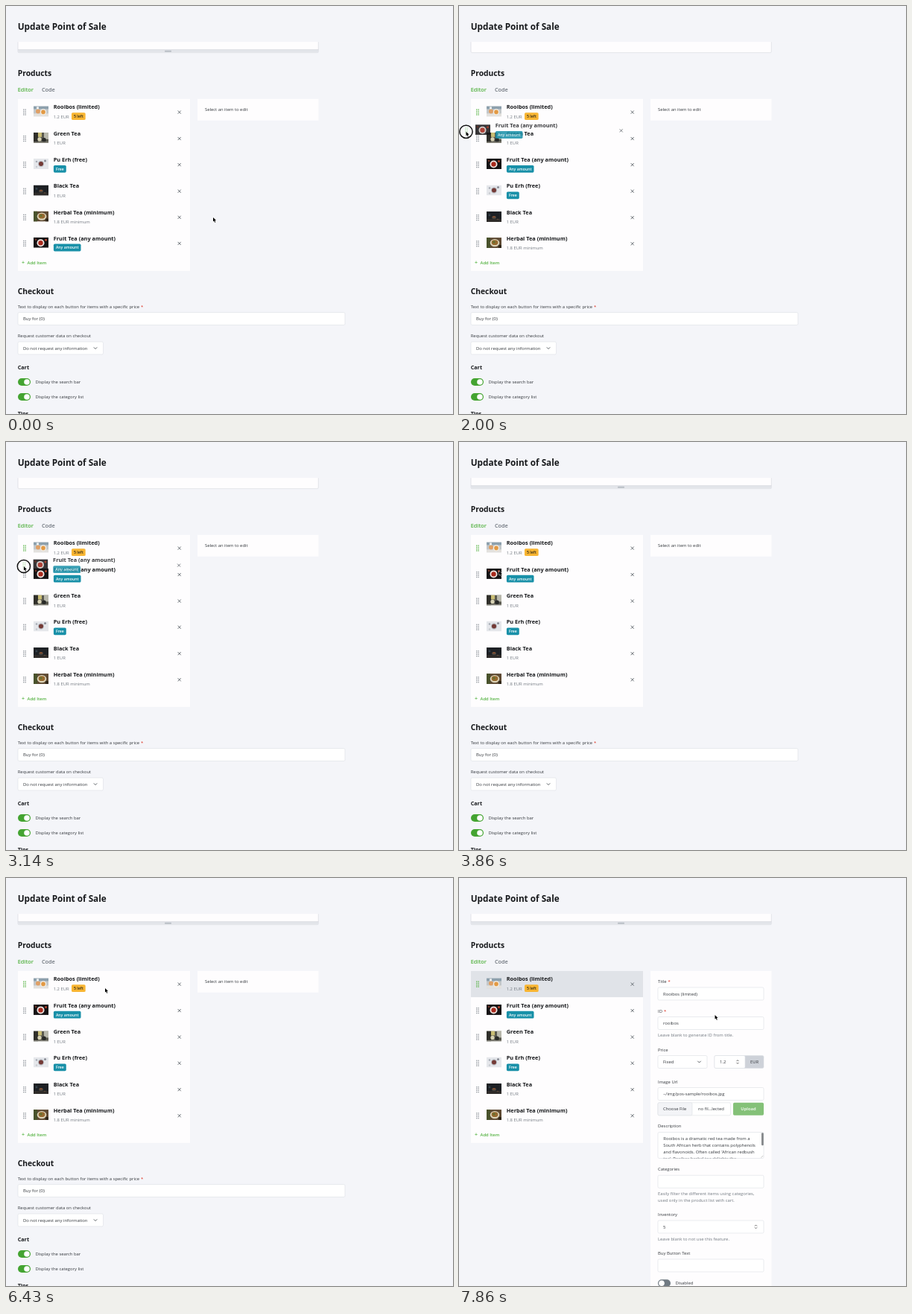
Animation of 600x548 px, one loop 8000 ms. Source, as an HTML page with a canvas:

```html
<!DOCTYPE html>
<html lang="en">
<head>
<meta charset="utf-8">
<title>Update Point of Sale</title>
<style>
html, body { margin: 0; width: 100%; height: 100%; overflow: hidden; background: #f4f5f9; }
canvas { display: block; width: 600px; height: 548px; }
</style>
</head>
<body>
<canvas id="stage"></canvas>
<script>
const canvas = document.getElementById('stage');
const ctx = canvas.getContext('2d');
const ratio = window.devicePixelRatio || 1;
canvas.width = 600 * ratio;
canvas.height = 548 * ratio;

const LOOP = 8000, STEPS = 56;
const BG = '#f4f5f9', CARD = '#fefdfe', INK = '#17191c', TEXT = '#34383d', MUTED = '#737a82';
const GREEN = '#51b13e', TOGGLE = '#44a431', TEAL = '#1890a8', LINE = '#dcdfe4', RED = '#c8301c';
const BODY = 5.88;
const GRAB = { x: 24.5, y: 320.3 };

// step, x, y of the pointer tip
const PATH = [
  [0, 278, 284], [8, 24.5, 320], [9, 24.5, 320], [10, 27.2, 305.5], [14, 9.5, 168.8], [15, 10, 167],
  [16, 16, 166.5], [19, 24, 167], [25, 23.8, 167], [33, 217, 207], [34, 222.5, 211], [36, 239, 213],
  [38, 240, 213], [44, 134.5, 149], [45, 133, 148], [50, 133, 148], [55, 343.5, 184]
];

const rooibos = { name: 'Rooibos (limited)', price: '1.2 EUR', badge: '5 left', thumb: thumbRooibos };
const green = { name: 'Green Tea', price: '1 EUR', thumb: thumbGreen };
const puErh = { name: 'Pu Erh (free)', badge: 'Free', thumb: thumbPuErh };
const black = { name: 'Black Tea', price: '1 EUR', thumb: thumbBlack };
const herbal = { name: 'Herbal Tea (minimum)', price: '1.8 EUR minimum', thumb: thumbHerbal };
const fruit = { name: 'Fruit Tea (any amount)', badge: 'Any amount', thumb: thumbFruit };

function text(str, x, y, color = TEXT, size = BODY, weight = 400, align = 'left') {
  ctx.font = `${weight} ${size}px "Open Sans", sans-serif`;
  ctx.fillStyle = color;
  ctx.textAlign = align;
  ctx.fillText(str, x, y);
  return ctx.measureText(str).width;
}

function rect(x, y, w, h, color) {
  ctx.fillStyle = color;
  ctx.fillRect(x, y, w, h);
}

function box(x, y, w, h, fill, stroke, r = 1.7) {
  ctx.beginPath();
  ctx.roundRect(x, y, w, h, r);
  if (fill) { ctx.fillStyle = fill; ctx.fill(); }
  if (stroke) { ctx.strokeStyle = stroke; ctx.lineWidth = 0.6; ctx.stroke(); }
}

function disc(x, y, r, color, ry = r) {
  ctx.beginPath();
  ctx.ellipse(x, y, r, ry, 0, 0, Math.PI * 2);
  ctx.fillStyle = color;
  ctx.fill();
}

function line(points, color, width) {
  ctx.beginPath();
  points.forEach(([x, y], i) => i ? ctx.lineTo(x, y) : ctx.moveTo(x, y));
  ctx.strokeStyle = color;
  ctx.lineWidth = width;
  ctx.stroke();
}

// Thumbnails are drawn in a 20 x 14 area
function thumbRooibos() {
  rect(0, 0, 20, 14, '#c3c8cb');
  rect(0, 0, 20, 4, '#8da0ad');
  rect(0, 10, 20, 4, '#e3e1de');
  disc(6, 7, 3, '#dfa067');
  disc(13, 8, 4.2, '#f3eee6');
  disc(13, 8, 2.8, '#e39a45');
  rect(4, 1, 3, 3, '#eceff0');
}

function thumbGreen() {
  rect(0, 0, 20, 14, '#5b5a50');
  rect(0, 0, 6, 14, '#302f2a');
  rect(6, 0, 5, 6, '#c9bd74');
  rect(14, 0, 6, 9, '#b8b8ac');
  disc(8, 9, 2.6, '#d8d3b5');
  disc(14, 10, 2.8, '#292a28');
  rect(0, 12.5, 20, 1.5, '#88867c');
}

function thumbPuErh() {
  rect(0, 0, 20, 14, '#e5e7eb');
  disc(10, 7, 4.2, '#bfc4ca');
  disc(10, 7, 3, '#743a36');
  disc(4, 4, 1.3, '#a7adb6');
  disc(15.5, 3, 1.5, '#8c8f98');
  disc(4, 11, 1.2, '#c7cad0');
}

function thumbBlack() {
  rect(0, 0, 20, 14, '#1d2024');
  rect(0, 10, 20, 4, '#2e2b29');
  disc(10, 8, 3, '#49443d', 2);
  disc(10, 7.3, 2, '#8c5030', 1);
  disc(15, 10.5, 1.6, '#5a4939', 0.8);
  disc(4, 5, 1.4, '#34414a');
}

function thumbHerbal() {
  rect(0, 0, 20, 14, '#5e4a33');
  rect(0, 0, 5, 14, '#49522c');
  disc(11, 7, 6.3, '#dcd3b8', 5.2);
  disc(11, 6.6, 4.4, '#966a2f', 3.4);
  disc(10, 6, 1.6, '#63702f');
  rect(16, 10, 4, 4, '#302719');
}

function thumbFruit() {
  rect(0, 0, 20, 14, '#151214');
  disc(9.5, 7.5, 5, '#efe8e4');
  disc(9.5, 7.5, 3.2, '#a92a1d');
  disc(16.5, 3.5, 1.5, '#b4402a');
  disc(3, 3, 1.3, '#693023');
}

function handle(y, color) {
  for (let i = 0; i < 8; i++) {
    const dx = i % 2 * 2.4, dy = Math.floor(i / 2) * 2.3;
    rect(23.1 + dx, y - 4.1 + dy, 1.3, 1.3, color);
  }
}

function cross(x, y, color) {
  line([[x - 2, y - 2], [x + 2, y + 2]], color, 0.95);
  line([[x + 2, y - 2], [x - 2, y + 2]], color, 0.95);
}

function badge(label, x, top) {
  const warn = label === '5 left';
  ctx.font = '600 5.2px "Open Sans", sans-serif';
  const w = ctx.measureText(label).width + 6;
  box(x, top + 18.5, w, 9.8, warn ? '#f8b532' : TEAL, null);
  text(label, x + 3, top + 25.3, warn ? '#2b2618' : '#fff', 5.2, 600);
}

function row(item, top, handleColor, crossColor) {
  handle(top + 17.8, handleColor);
  ctx.save();
  ctx.translate(37, top + 9.6);
  ctx.beginPath();
  ctx.rect(0, 0, 20, 14);
  ctx.clip();
  item.thumb();
  ctx.restore();
  text(item.name, 63.7, top + 13.5, INK, 7.35, 700);
  if (item.price) text(item.price, 63.7, top + 25.9, MUTED);
  if (item.badge) badge(item.badge, item.price ? 88 : 63.9, top);
  cross(232.7, top + 17.8, crossColor);
}

function chevron(x, y) {
  line([[x - 2.2, y - 1], [x, y + 1.2], [x + 2.2, y - 1]], '#343a40', 0.8);
}

function spinner(x, y) {
  line([[x - 1.5, y - 0.9], [x, y - 2.4], [x + 1.5, y - 0.9]], '#444', 0.8);
  line([[x - 1.5, y + 0.9], [x, y + 2.4], [x + 1.5, y + 0.9]], '#444', 0.8);
}

function toggle(y, x, on, label) {
  box(x, y - 5, 17, 10, on ? TOGGLE : '#707a82', null, 5);
  disc(on ? x + 12 : x + 5, y, 3.8, '#fff');
  text(label, x + 23.5, y + 2.2);
}

function label(str, x, y, required) {
  const w = text(str, x, y);
  if (required) text('*', x + w + 2, y, '#e0483a', BODY, 600);
}

function field(y, value = '', x = 267, w = 142) {
  box(x, y, w, 17, '#fff', LINE);
  text(value, x + 7, y + 10.7);
}

function header(dragging) {
  box(16, 40, 403.3, 22.7, CARD, '#d3d6dc');
  if (!dragging) {
    rect(16, 58.7, 403.3, 4, '#e3e5ea');
    rect(16, 58.5, 403.3, 0.6, '#cbd0d6');
    box(213, 59.8, 9, 2, '#b9bec5', null, 0.8);
  }
  rect(0, 0, 600, 48.3, BG);
  text('Update Point of Sale', 15.7, 31.7, INK, 11.76, 700);
  text('Products', 15.7, 93.8, INK, 10.3, 700);
  text('Editor', 15.7, 114.7, GREEN, 7.35, 600);
  text('Code', 47.9, 114.7, '#6d747c', 7.35, 600);
}

function checkout() {
  text('Checkout', 15.7, 386.7, INK, 10.3, 700);
  label('Text to display on each button for items with a specific price', 15.7, 405.6, true);
  field(411.5, 'Buy for {0}', 16, 439);
  text('Request customer data on checkout', 15.7, 445);
  field(451, 'Do not request any information', 16, 114.5);
  chevron(120, 459.4);
  text('Cart', 15.7, 488.2, INK, 7.2, 700);
  toggle(505, 16, true, 'Display the search bar');
  toggle(525, 16, true, 'Display the category list');
  text('Tips', 15.7, 550.3, INK, 7.2, 700);
}

function editor() {
  rect(257, 124.8, 162.5, 424, CARD);
  label('Title', 267, 141.1, true);
  field(147, 'Rooibos (limited)');
  label('ID', 267, 180.7, true);
  field(186.5, 'rooibos');
  text('Leave blank to generate ID from title.', 267, 213.4, MUTED);

  label('Price', 267, 232.8);
  field(238.5, 'Fixed', 267, 66);
  chevron(322.5, 246.8);
  box(343, 238.5, 66, 17, '#ced2d9', LINE);
  field(238.5, '1.2', 343, 41);
  spinner(374, 247);
  text('EUR', 396.5, 249.2, TEXT, BODY, 400, 'center');

  label('Image Url', 267, 275.5);
  field(281.5, '~/img/pos-sample/rooibos.jpg');
  field(301.8, '', 267, 97.5);
  box(267, 301.8, 46, 17, '#f3f4f7', LINE);
  text('Choose File', 274, 312.4);
  text('no fil...lected', 321, 312.4);
  box(368, 301.8, 41, 17, '#84c178', null);
  text('Upload', 388.5, 312.4, '#fff', BODY, 600, 'center');

  label('Description', 267, 335.3);
  box(267, 341.5, 142, 35, '#fff', LINE);
  ctx.save();
  ctx.beginPath();
  ctx.rect(267, 341.5, 142, 35);
  ctx.clip();
  ['Rooibos is a dramatic red tea made from a', 'South African herb that contains polyphenols',
    "and flavonoids. Often called 'African redbush", "tea', Rooibos herbal tea delights the"]
    .forEach((str, i) => text(str, 274.3, 351.8 + i * 9.2));
  box(406, 342.3, 2.8, 17, '#85888b', null, 1.2);
  line([[405.5, 375.7], [408.3, 372.9]], '#888', 0.5);
  ctx.restore();

  label('Categories', 267, 393.2);
  field(399.3);
  text('Easily filter the different items using categories,', 267, 425.7, MUTED);
  text('used only in the product list with cart.', 267, 435.1, MUTED);
  label('Inventory', 267, 454.2);
  field(460, '5');
  spinner(398.5, 468.4);
  text('Leave blank to not use this feature.', 267, 487.2, MUTED);
  label('Buy Button Text', 267, 506.2);
  field(512);
  toggle(544.2, 267, false, 'Disabled');
}

function pointer(x, y, ring) {
  if (ring) {
    ctx.beginPath();
    ctx.arc(x, y, 8.6, 0, Math.PI * 2);
    ctx.fillStyle = 'rgba(255,255,255,.5)';
    ctx.fill();
    ctx.strokeStyle = '#111';
    ctx.lineWidth = 1.5;
    ctx.stroke();
  }
  ctx.beginPath();
  [[0, 0], [0, 5.6], [1.3, 4.5], [2.3, 6.8], [3.3, 6.4], [2.3, 4.2], [4, 4]]
    .forEach(([dx, dy]) => ctx.lineTo(x + dx, y + dy));
  ctx.closePath();
  ctx.strokeStyle = '#fff';
  ctx.lineWidth = 0.8;
  ctx.stroke();
  ctx.fillStyle = '#000';
  ctx.fill();
}

function pointerAt(n) {
  let i = 0;
  while (i < PATH.length - 2 && n >= PATH[i + 1][0]) i++;
  const [n0, x0, y0] = PATH[i], [n1, x1, y1] = PATH[i + 1];
  const p = (n - n0) / (n1 - n0), e = p * p * (3 - 2 * p);
  return { x: x0 + (x1 - x0) * e, y: y0 + (y1 - y0) * e };
}

function fruitIndex(n) {
  if (n < 11) return 5;
  if (n < 12) return 4;
  if (n < 13) return 3;
  return n < 15 ? 2 : 1;
}

function draw(n) {
  const tip = pointerAt(n);
  const dragging = n >= 10 && n < 25;
  const selected = n >= 47;
  const ring = (n >= 9 && n < 25) || (n >= 46 && n < 49);
  const items = [rooibos, green, puErh, black, herbal];
  items.splice(fruitIndex(n), 0, fruit);

  ctx.setTransform(ratio, 0, 0, ratio, 0, 0);
  rect(0, 0, 600, 548, BG);
  header(n >= 11 && n < 25);
  rect(16, 124.8, 231, 231, CARD);
  if (selected) rect(16, 124.8, 231, 35.3, '#e0e3e8');

  let top = 124.8;
  items.forEach((item, i) => {
    const near = Math.abs(tip.y - top - 17.8) < 9;
    const held = near && tip.x > 20 && tip.x < 29 && n < 10 || n === 10 && item === fruit;
    const first = i === 0 && n >= 9;
    const over = near && tip.x > 222 && tip.x < 243;
    row(item, top, held || first ? GREEN : '#8b9198', over ? RED : '#5a6067');
    top += item.badge ? 35.5 : 35.1;
  });
  text('+', 21, 346.8, GREEN, 7, 600);
  text('Add Item', 28.5, 346.8, GREEN, BODY, 600);

  if (selected) {
    editor();
  } else {
    rect(257, 124.8, 162.5, 29, CARD);
    text('Select an item to edit', 267, 141.4);
    checkout();
  }

  if (dragging) {
    ctx.save();
    ctx.globalAlpha = 0.85;
    ctx.translate(tip.x - GRAB.x, tip.y - GRAB.y);
    row(fruit, 301.1, GREEN, '#5a6067');
    ctx.restore();
  }
  pointer(tip.x, tip.y, ring);
}

function frame(now) {
  const t = now % LOOP;
  draw(Math.min(STEPS - 1, Math.floor((t + 6) * STEPS / LOOP)));
  requestAnimationFrame(frame);
}
requestAnimationFrame(frame);
</script>
</body>
</html>
```
